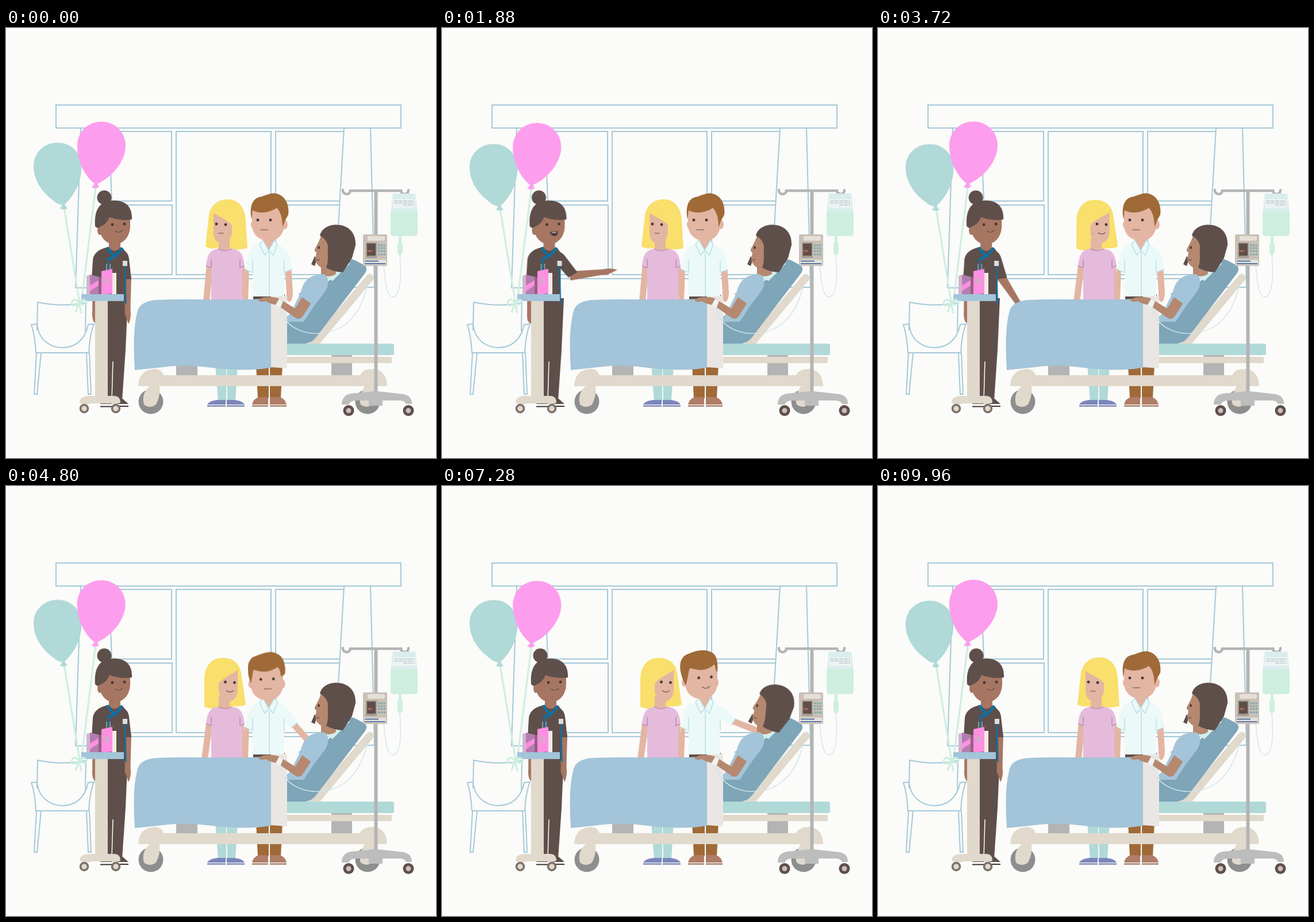
Recreate the animation shown at these times as an HTML page. Size 748 by 748 pixels, loop 10 s.

```html
<!DOCTYPE html>
<html lang="en">
<head>
<meta charset="utf-8">
<title>Hospital visit</title>
<style>
html, body { margin: 0; width: 100%; height: 100%; overflow: hidden; background: #fbfbf9; }
svg { display: block; width: 100vw; height: 100vh; }

.line { fill: none; stroke: #a5c9d9; stroke-width: 2; }
.thin { fill: none; stroke: #cfe5e9; stroke-width: 1.4; }
.seam { fill: none; stroke: #b4dde2; stroke-width: 1.3; }
.string { fill: none; stroke: #cdeee0; stroke-width: 3; }
.mouth { fill: none; stroke: #5f4f4b; stroke-width: 1.1; stroke-linecap: round; }
.dark { fill: #5f4f4b; }
.brown { fill: #a67662; }
.warm { fill: #b5886f; }
.skin { fill: #e3b5a3; }
.teal { fill: #b0d9d8; }
.green { fill: #cdeee0; }
.pink { fill: #fd9ded; }
.blue { fill: #a3c4d9; }
.beige { fill: #e0d9cc; }
.grey { fill: #b4b4b4; }
.tan { fill: #9f6a37; }
.shirt { fill: #ebf9f8; }
.eye { fill: #443735; }

[class*="a-"] { animation: 10s ease-in-out infinite; }

.a-pink { animation-name: pink; }
@keyframes pink {
  0%, 100% { transform: none; }
  5%, 15.5%, 24%, 35%, 45%, 56%, 67%, 78%, 89% { transform: translate(.4px, -2px); }
  10%, 18.8%, 29%, 40%, 50%, 61.6%, 72%, 82%, 95% { transform: translate(-.7px, 2.2px); }
}
.a-teal { animation-name: teal; }
@keyframes teal {
  0%, 100% { transform: none; }
  8%, 27.6%, 47.5%, 70% { transform: translateY(-1.6px); }
  17%, 37%, 61%, 82% { transform: translateY(2.4px); }
  91% { transform: translateY(-1px); }
}

.a-nurse { animation-name: nurse; }
@keyframes nurse {
  0%, 4%, 40%, 100% { transform: none; }
  11%, 33% { transform: translateX(-2.5px); }
}
.a-nurse-head { animation-name: nurse-head; transform-origin: 188px 380px; }
@keyframes nurse-head {
  0%, 20%, 33%, 100% { transform: none; }
  24%, 29% { transform: translate(2px, 1px) rotate(-3.5deg); }
}
.a-nurse-arm { animation-name: nurse-arm; transform-origin: 206px 395px; }
@keyframes nurse-arm {
  0%, 4%, 40%, 100% { transform: none; }
  12%, 33% { transform: rotate(-31deg); }
}
.a-nurse-hand { animation-name: nurse-hand; transform-origin: 210px 439px; }
@keyframes nurse-hand {
  0%, 4%, 40%, 100% { transform: none; }
  12%, 33% { transform: rotate(-64deg); }
}
.a-hush { animation-name: hush; }
@keyframes hush { 0%, 11.9%, 31%, 100% { opacity: 1; } 12%, 30.9% { opacity: 0; } }
.a-speak { animation-name: speak; }
@keyframes speak { 0%, 11.9%, 31%, 100% { opacity: 0; } 12%, 30.9% { opacity: 1; } }
.chat { animation: chat .4s ease-in-out infinite; transform-origin: 197px 357px; }
@keyframes chat { 0%, 100% { transform: scaleY(.3); } 50% { transform: scaleY(1.1); } }

.a-girl-hair { animation-name: girl-hair; }
@keyframes girl-hair {
  0%, 32%, 84%, 100% { d: path("M347 380L353 325C357 306 370 298 386 298C404 298 416 312 417 335L420 383Q403 387 388 384L366 383Q355 385 347 380Z"); }
  38%, 78% { d: path("M345 384L345 335C346 312 358 299 377 299C395 299 406 308 409 325L417 380Q411 384 398 383L372 387Q358 389 345 384Z"); }
}
.a-girl-face { animation-name: girl-face; }
@keyframes girl-face {
  0%, 32%, 85%, 100% { d: path("M361 322C372 329 386 334 393 343L393 358C390 369 384 375 376 375C366 374 361 366 361 356Z"); }
  38%, 78% { d: path("M370 344C375 335 392 328 403 320L403 355C403 366 396 374 388 375C378 375 372 368 370 358Z"); }
}
.a-girl-look { animation-name: girl-look; }
@keyframes girl-look { 0%, 32%, 87%, 100% { transform: none; } 38%, 78% { transform: translateX(15.5px); } }
.a-girl-arms { animation-name: girl-arms; transform-origin: 380px 395px; }
@keyframes girl-arms { 0%, 32%, 94%, 100% { transform: none; } 38%, 78% { transform: rotate(2deg); } 84% { transform: rotate(1deg); } }
.a-open { animation-name: open; }
@keyframes open { 0%, 80.7%, 83.5%, 100% { opacity: 1; } 80.8%, 83.4% { opacity: 0; } }
.a-shut { animation-name: shut; }
@keyframes shut { 0%, 80.7%, 83.5%, 100% { opacity: 0; } 80.8%, 83.4% { opacity: 1; } }
.a-girl-mouth { animation-name: girl-mouth; }
@keyframes girl-mouth {
  0%, 25%, 97%, 100% { d: path("M370 357Q374 357 378 357"); }
  27%, 94% { d: path("M368 356Q374 361 380 356"); }
}

.a-man-hair { animation-name: man-hair; }
@keyframes man-hair {
  0%, 43%, 80%, 100% { d: path("M427 333C423 312 428 297 441 294C451 292 462 284 474 289C488 295 493 310 491 325L485 336L481 347C481 330 477 318 471 313C465 317 455 321 446 321C438 321 432 319 429 317C428 322 428 328 427 333Z"); }
  52.5%, 74% { d: path("M424 347C412 325 410 302 424 294C434 289 450 283 463 287C476 290 481 300 479 324L477 322L474 311C474 311 473 311 472 312C465 317 458 320 450 320C442 320 434 317 431 317C428 325 428 335 424 347Z"); }
}
.a-man-face { animation-name: man-face; }
@keyframes man-face { 0%, 43%, 80%, 100% { transform: none; } 52.5%, 74% { transform: translate(-5px, .5px); } }
.a-man-ears { animation-name: man-ears; }
@keyframes man-ears { 0%, 43%, 80%, 100% { transform: none; } 52.5%, 74% { transform: translateX(-9px); } }
.a-man-look { animation-name: man-look; }
@keyframes man-look { 0%, 43%, 80%, 100% { transform: none; } 52.5%, 74% { transform: translate(9px, -1px) rotate(-4deg); } }
.look { transform-origin: 449px 340px; }
.a-man-head { animation-name: man-head; transform-origin: 457px 372px; }
@keyframes man-head {
  0%, 43%, 99%, 100% { transform: none; }
  48% { transform: translate(.5px, 2.5px); }
  53%, 74% { transform: none; }
  80%, 94% { transform: translate(2px, .5px); }
}
.a-man-mouth { animation-name: man-mouth; }
@keyframes man-mouth {
  0%, 50%, 98%, 100% { d: path("M443 351Q449 351 456 351"); }
  53%, 95% { d: path("M443 350Q449 356 456 350"); }
}
.a-man-arm { animation-name: man-arm; transform-origin: 480px 392px; }
@keyframes man-arm { 0%, 43%, 81%, 100% { transform: none; } 52%, 74% { transform: rotate(-35deg); } }
.a-man-hand { animation-name: man-hand; transform-origin: 491px 420px; }
@keyframes man-hand {
  0%, 43%, 81%, 100% { transform: none; }
  52%, 60%, 68%, 74% { transform: rotate(-29deg); }
  56%, 64%, 71% { transform: rotate(-32deg); }
}

.a-patient { animation-name: patient; transform-origin: 565px 425px; }
@keyframes patient { 0%, 48.5%, 91%, 100% { transform: none; } 53%, 85% { transform: translateY(2px) rotate(5.5deg); } }
</style>
</head>
<body>
<svg viewBox="0 0 748 748">
  <!-- window and curtains -->
  <g class="line">
    <path d="M87 134H687V174H87ZM130 174L121 452H190L179 174M588 174L572 451H641L634 174"/>
    <path d="M180 180H288V301H184M296 180H461V429H296ZM588 180H469V301H580M186 308H289V429H188M580 308H469V429H574M190 436H572"/>
  </g>

  <!-- chair -->
  <g class="line">
    <path d="M54 526L55 477Q97 486 139 478L138 528"/>
    <path d="M44 516L54 515C57 545 80 556 98 556C118 556 137 545 143 516L153 515C147 530 145 545 144 565H52C51 545 49 530 44 516Z"/>
    <path d="M53 565L49 637H54L61 565M140 565L143 637H148L145 565"/>
  </g>

  <!-- balloons -->
  <g class="a-teal">
    <path class="string" d="M101 312L128 478"/>
    <path class="teal" d="M90 199.5C114 199.5 131.5 218 131.5 242C131 272 116 294 102 307L107 314Q100 317 94 314L98 308C92 307 88 305 82 300C62 285 48 264 48 240C48 217 66 199.5 90 199.5Z"/>
  </g>
  <g class="a-pink">
    <path class="string" d="M156 278L131 478"/>
    <path class="pink" d="M166 163C190 163 208 181 208 205C208 232 184 260 159 271L162 277L155 279L149 277L154 271C134 254 124 229 124 205C124 181 142 163 166 163Z"/>
  </g>

  <!-- nurse -->
  <path class="dark" d="M165 470H212L208 560L202 648H164Z"/>
  <path d="M186 580L184 648" stroke="#fbfbf9" stroke-width="1.5"/>
  <path class="dark" d="M164 654Q170 645 180 645L195 654ZM182 654Q188 644 203 645L213 654Z"/>
  <path d="M164 658.5H193M190 658H213" stroke="#3f3634" stroke-width="2"/>
  <g class="a-nurse">
    <path class="brown" d="M151 430L150 500Q151 514 158 514L163 505V430Z"/>
    <g class="a-nurse-arm">
      <g class="a-nurse-hand">
        <path class="brown" d="M202 432L207 488Q205 497 209 503L213 515Q217 508 217 497L216.500 488L218 432Z"/>
      </g>
      <path class="dark" d="M196 384Q212 386 214 401L218 437H200L194 405Z"/>
    </g>
    <path class="dark" d="M177 381C161 385 152 392 151 404L149 437H162V478H209V400Q210 387 201 382Z"/>
    <path class="brown" d="M179 366H199V382Q189 393 179 382Z"/>
    <path d="M177 381Q180 392 192 398M202 382Q196 395 176 403" fill="none" stroke="#0d70a5" stroke-width="4.5"/>
    <path d="M178 402V422M207 413L208.500 480" fill="none" stroke="#0d70a5" stroke-width="2.500"/>
    <path d="M175 410V424M181 410V424" stroke="#c9d6d8"/>
    <rect x="203" y="405" width="8" height="9" fill="#dcdedd"/>
    <g class="a-nurse-head">
      <circle class="dark" cx="171" cy="295" r="12.500"/>
      <ellipse class="brown" cx="163" cy="352" rx="4" ry="8"/>
      <path class="brown" d="M162 320H216V346C215 364 204 376 189 376C173 376 163 363 162 346Z"/>
      <path class="dark" d="M155 345C153 316 163 300 188 300C210 300 220 313 219 333Q199 336 180 329Q175 342 163 346L159 348Z"/>
      <circle class="eye" cx="185" cy="342" r="2.400"/><circle class="eye" cx="206" cy="341" r="2.400"/>
      <path class="mouth a-hush" d="M190 353Q197 358 203 352"/>
      <g class="a-speak"><g class="chat">
        <path class="eye" d="M190 354Q197 355 204 352Q204 363 198 363Q192 362 190 354Z"/>
        <path d="M193 355Q198 356 202 354L201 356Q198 357 194 356.500Z" fill="#fff"/>
      </g></g>
    </g>
  </g>

  <!-- gift cart -->
  <path d="M140 431L147 429V463H140Z" fill="#d3b3d2"/>
  <path d="M146 429L162 433V463H146Z" fill="#b47db0"/>
  <path d="M146 448L162 438V447L146 458Z" fill="#fd8fe2"/>
  <path d="M161 433H167V463H161Z" fill="#94627f"/>
  <path d="M184 426H192V463H184Z" fill="#f2e9e8"/>
  <path d="M166 423L185 419V462L166 464Z" fill="#fd8fe2"/>
  <ellipse cx="175" cy="440" rx="5" ry="6.500" fill="#dda6cf"/>
  <path class="beige" d="M155 474H177V640H188Q199 640 199 652Q186 656 183 653H148Q140 657 128 652Q128 641 143 640H155Z"/>
  <rect class="blue" x="131" y="463" width="74" height="12"/>
  <g fill="#e0d9cc" stroke="#7b706a" stroke-width="3.500">
    <circle cx="136" cy="662" r="6.500"/><circle cx="191" cy="662" r="6.500"/>
  </g>
  <path class="string" d="M127 478C120 468 112 474 115 482Q122 484 127 478C132 470 141 472 140 480Q133 483 127 478L121 495M127 478L131 496"/>

  <!-- bed supports -->
  <path class="grey" d="M296 586H333V606H296ZM566 566H602V606H566Z"/>

  <!-- legs of the visitors -->
  <path class="teal" d="M364 585H383V649H369ZM384 585H403L399 649H385Z"/>
  <path class="tan" d="M435 585H457V644H438ZM459 585H481L478 644H459Z"/>
  <path d="M350 655Q354 648 368 647H382V655ZM384 655V647H397Q411 648 415 655Z" fill="#7b86bb"/>
  <path d="M428 655Q430 645 440 642H456V655ZM459 655V642H476Q486 645 488 655Z" fill="#b07d66"/>
  <path d="M350 657.500H382M384 657.500H415" stroke="#65709f" stroke-width="2"/>
  <path d="M428 657.500H456M459 657.500H488" stroke="#91644f" stroke-width="2"/>

  <!-- man -->
  <path class="skin" d="M415 418H423L421 474H414Z"/>
  <path class="dark" d="M430 464H485V474H430Z"/>
  <g class="a-man-arm">
    <g class="a-man-hand">
      <path class="skin" d="M485 412H496L499 460Q499 474 493 477Q487 475 488 460Z"/>
    </g>
    <path class="shirt" d="M470 379C486 380 492 390 495 405L498 420L484 425L476 405Z"/>
    <path class="seam" d="M484 425L498 420"/>
  </g>
  <path class="shirt" d="M447 373C432 376 424 384 421 398L416 420L429 426V467H484V400Q485 385 478 379L466 372Z"/>
  <path class="seam" d="M416 420L428 425M429 403V426M484 405V426M458 390V467"/>
  <path class="skin" d="M447 362H467V374L457 387L447 374Z"/>
  <g class="shirt">
    <path id="collar" d="M447 369L457 387L450 395L441 376ZM467 369L457 387L465 395L472 376Z" stroke="#b4dde2" stroke-width="1.3"/>
  </g>
  <g class="a-man-head">
    <g class="a-man-ears">
      <ellipse class="skin" cx="430" cy="342" rx="4" ry="7"/><ellipse class="skin" cx="485" cy="342" rx="5" ry="8"/>
    </g>
    <path class="skin a-man-face" d="M428 312H484V344C483 360 472 370 457 370C441 370 429 360 428 344Z"/>
    <path class="tan a-man-hair"/>
    <g class="a-man-look look">
      <circle class="eye" cx="438" cy="334" r="2.400"/><circle class="eye" cx="460" cy="334" r="2.400"/>
      <path class="mouth a-man-mouth"/>
    </g>
  </g>

  <!-- girl -->
  <g class="a-girl-arms">
    <path class="skin" d="M349 410L343 475H354L359 425V410ZM405 410L412 475H421L414 410Z"/>
  </g>
  <path class="a-girl-hair" fill="#f9df6b"/>
  <path class="skin" d="M370 366H389V385Q379 391 370 385Z"/>
  <path d="M369 384C355 386 350 394 348 414L357 417V474H411V417L415 414C413 394 408 386 393 384Q381 391 369 384Z" fill="#e5bbdc"/>
  <path d="M369 384Q381 391 393 384M348 414L357 417M406 417L415 414M357 402V417M407 402V417" fill="none" stroke="#b07fae" stroke-width="1.200"/>
  <path class="skin a-girl-face"/>
  <g class="a-girl-look">
    <g class="a-open"><circle class="eye" cx="366" cy="341" r="2.400"/><circle class="eye" cx="382" cy="342" r="2.400"/></g>
    <path class="mouth a-shut" d="M362 344Q366 347 370 344M379 344Q383 347 387 344"/>
    <path class="mouth a-girl-mouth"/>
  </g>

  <!-- bed -->
  <path class="beige" d="M527 549L627 431Q634 424 639 432Q641 436 637 440L546 549Z"/>
  <path d="M485 549H522Q533 547 541 536L625 426Q630 418 624 413L607 404Q600 400 594 406L540 462L485 505Z" fill="#7ea5b8"/>
  <path d="M556 434L592 406L598 410L568 440Z" fill="#d3efec"/>
  <rect class="teal" x="480" y="549" width="195" height="20" rx="3"/>
  <rect class="beige" x="488" y="572" width="183" height="11" rx="2"/>
  <g fill="#8e8e8e"><circle cx="629" cy="650" r="21.500"/><circle cx="252" cy="650" r="21.500"/></g>
  <path class="beige" d="M230 623Q231 594 260 593Q271 594 274 604H616Q620 593 640 593Q662 596 663 623H646Q645 640 638 654Q628 663 617 655Q612 645 624 623H267Q269 640 261 655Q250 663 240 655Q235 636 250 623Z"/>

  <!-- patient -->
  <path class="warm" d="M548 408L572 406L574 428Q560 436 548 428Z"/>
  <path class="blue" d="M485 511L500 486L512 462C516 445 522 436 535 431L552 428C562 432 563 446 556 457L535 485L518 511Z"/>
  <g class="a-patient">
    <path class="dark" d="M537 397L531 411L537 414L541 402Z"/>
    <path class="warm" d="M549 358C545 373 538 381 536.500 387L540 391L538 402C539 411 546 418 556 419L566 424L570 370Z"/>
    <path class="dark" d="M546 361C550 345 568 340 583 343C600 347 609 360 608 378L602 400L586 425Q569 424 557 417C562 404 559 392 560 379Q558 368 546 361Z"/>
    <ellipse class="eye" cx="544" cy="382" rx="1.800" ry="2.400"/>
    <path class="mouth" d="M540 402Q542 405 545 403"/>
  </g>
  <path class="blue" d="M224 595C222 560 221 520 229 492C233 479 246 474 264 473C330 470 400 475 463 470V590C430 598 380 594 340 589C300 584 260 592 224 595Z"/>
  <path d="M461 467L489 466V592L461 590Z" fill="#e9e6e4"/>
  <path class="warm" d="M517 465L503 488L474 470C460 466 444 467 439 474Q444 478 452 475Q458 480 472 482L505 505Q512 508 517 500L531 478Z"/>
  <path d="M475 471L482 475L477 488L469 482Z" fill="#eef3f2"/>
  <path class="blue" d="M514 459Q522 442 540 438L556 450L531 480L508 463Z"/>
  <path class="thin" d="M476 486C482 512 500 526 530 531C590 536 618 495 629 446"/>

  <!-- drip stand -->
  <path d="M586 282A6.500 6.500 0 0 0 599 283H687A6.500 6.500 0 0 0 700 282" fill="none" stroke="#b4b4b4" stroke-width="4.500" stroke-linecap="round"/>
  <path class="grey" d="M640.500 281H646.500V634H640.500Z"/>
  <path d="M640 632H647L692 637Q706 640 706 654H696Q694 649 686 648H655V657H631V648H608Q598 649 596 655H584Q584 639 600 636Z" fill="#bdbdbd"/>
  <g fill="#cbbdbb" stroke="#5f4f4b" stroke-width="5">
    <circle cx="596" cy="665.500" r="7"/><circle cx="700" cy="665.500" r="7"/>
  </g>
  <path d="M673 288H712Q717 324 716 356Q716 362 710 362H675Q669 362 669 356Q668 324 673 288Z" fill="#d9eeed"/>
  <path class="green" d="M669 319H716V356Q716 362 710 362H675Q669 362 669 356Z"/>
  <rect x="673" y="298" width="39" height="15" fill="#edf3f2"/>
  <path d="M675 301H710M675 304.500H710M691 308H710" stroke="#b9c9cc" stroke-width="1.500" stroke-dasharray="7 1"/>
  <path class="green" d="M683 362H688V372L690 376V390L687 395H683L681 390V376L683 372Z"/>
  <path class="thin" d="M685 394C688 432 687 466 673 468C660 466 660 434 657 414"/>

  <!-- pump -->
  <rect x="621" y="359" width="42" height="55" rx="2" fill="#c9c0b6"/>
  <rect x="629" y="362" width="30" height="8" rx="2" fill="#e5dfd7"/>
  <rect x="626" y="373" width="19" height="27" fill="#a49b94"/>
  <rect class="dark" x="628" y="375" width="15" height="21"/>
  <path d="M629 388H637" stroke="#ad665c" stroke-width="3"/>
  <path d="M647 378H660M647 383H660M647 388H660M647 394H660" stroke="#83aab1" stroke-width="3" stroke-dasharray="3.500 1.300"/>
  <rect x="623" y="403" width="38" height="9" fill="#e5e1dc"/>
  <path d="M624 405.500H648M624 410H660" stroke="#55749f" stroke-width="2"/>
</svg>
</body>
</html>
```
